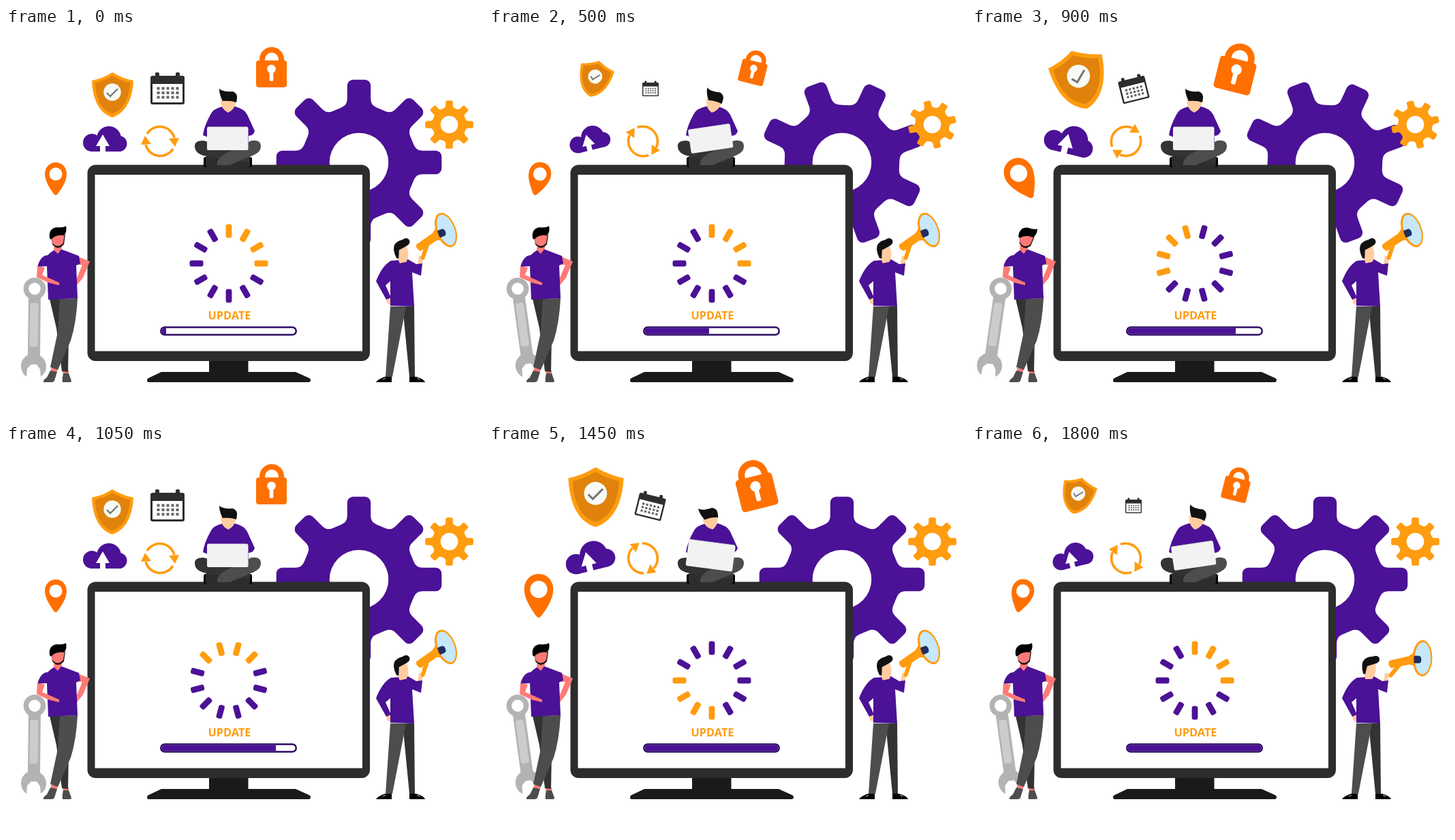
Recreate the animation shown at these times as an HTML page with a canvas. Size 700 by 570 pixels, loop 1850 ms.

```html
<!DOCTYPE html>
<html lang="en">
<head>
<meta charset="utf-8">
<title>Update</title>
<style>
html, body { margin: 0; width: 700px; height: 570px; overflow: hidden; background: #fff; }
canvas { display: block; }
</style>
</head>
<body>
<canvas id="stage" width="700" height="570"></canvas>
<script>
const ctx = document.getElementById('stage').getContext('2d');
const LOOP = 1850, STEP = 60, BEAT = 5;
const PURPLE = '#4b1196', ORANGE = '#ff9c0f', DEEP = '#ff7000', DARK = '#2d2d2d';
const GREY = '#4d4d4d', SHADE = '#333', SKIN = '#ffcc9f', PINK = '#ff7a76';

function shape(d, color) {
  ctx.fillStyle = color;
  ctx.fill(new Path2D(d));
}

function line(d, color, width) {
  ctx.strokeStyle = color;
  ctx.lineWidth = width;
  ctx.stroke(new Path2D(d));
}

function oval(x, y, rx, ry, color) {
  ctx.fillStyle = color;
  ctx.beginPath();
  ctx.ellipse(x, y, rx, ry, 0, 0, 7);
  ctx.fill();
}

const disc = (x, y, r, color) => oval(x, y, r, r, color);

function box(x, y, w, h, r, color) {
  ctx.fillStyle = color;
  ctx.beginPath();
  ctx.roundRect(x, y, w, h, r);
  ctx.fill();
}

// Turns and scales a part around its pivot, then shifts it.
function turned(x, y, deg, draw, size = 1, dx = 0, dy = 0) {
  ctx.save();
  ctx.translate(x + dx, y + dy);
  ctx.rotate(deg * Math.PI / 180);
  ctx.scale(size, size);
  ctx.translate(-x, -y);
  draw();
  ctx.restore();
}

// Linear value between key points [step, value].
function along(points, n) {
  const i = Math.max(1, points.findIndex(p => p[0] >= n));
  const [a, va] = points[i - 1], [b, vb] = points[i];
  return va + (vb - va) * (n - a) / (b - a);
}

function gear(x, y, tip, body, half, hole, deg, color) {
  const corners = [];
  for (let i = 0; i < 8; i++) {
    const a = (deg + i * 45) * Math.PI / 180, c = Math.cos(a), s = Math.sin(a);
    for (const [u, r] of [[-half, body], [-half, tip], [half, tip], [half, body]]) {
      corners.push({ x: x + u * c + r * s, y: y + u * s - r * c, round: half * (r === tip ? 0.5 : 0.8) });
    }
  }
  const last = corners[corners.length - 1];
  ctx.fillStyle = color;
  ctx.beginPath();
  ctx.moveTo((last.x + corners[0].x) / 2, (last.y + corners[0].y) / 2);
  corners.forEach((p, i) => {
    const next = corners[(i + 1) % corners.length];
    ctx.arcTo(p.x, p.y, next.x, next.y, p.round);
  });
  ctx.fill();
  disc(x, y, hole, '#fff');
}

function monitor() {
  box(119.5, 200.5, 414.5, 287.5, 12, DARK);
  box(130.5, 215, 392.5, 258.5, 0, '#fff');
  box(298, 488, 57.5, 17, 0, '#1a1a1a');
  shape('M228 504H425L445 513Q447 514 447 516Q447 519 444 519H209Q207 519 207 516Q207 514 209 513Z', '#1a1a1a');
}

function spinner(start) {
  for (let i = 0; i < 12; i++) {
    turned(327, 345, start + i * 30, () =>
      box(322.6, 287.5, 8.8, 20, 3, i < 4 ? ORANGE : PURPLE));
  }
}

function progress(width) {
  ctx.fillStyle = ORANGE;
  ctx.font = '700 16.3px "Open Sans", sans-serif';
  ctx.textAlign = 'center';
  ctx.fillText('UPDATE', 328, 426.5);
  const bar = color => box(228.5, 439.7, 196, 8.6, 4.3, color);
  box(226, 437.2, 201, 13.6, 6.8, '#2d0b63');
  bar('#fff');
  ctx.save();
  ctx.beginPath();
  ctx.rect(227, 437, width, 14);
  ctx.clip();
  bar(PURPLE);
  ctx.restore();
}

function shield() {
  const edge = 'M156 65Q171 74 187 77C186 100 178 124 156 131C134 124 127 100 126 77Q142 74 156 65Z';
  shape(edge, ORANGE);
  turned(156, 97, 0, () => shape(edge, '#e0820c'), 0.84);
  disc(156, 94, 12.7, '#f7faf5');
  line('M148 95L153 100L164 89', '#777', 2.3);
}

function calendar() {
  box(212, 70, 50, 42, 3, DARK);
  for (const x of [219, 249]) box(x, 65, 6, 11, 2, DARK);
  box(215, 82, 44, 27, 0, '#fff');
  for (let i = 0; i < 15; i++) {
    box(221.5 + i % 5 * 7, 86.5 + Math.floor(i / 5) * 6.5, 4, 4, 0, '#666');
  }
}

function lock() {
  line('M376 52V46A14 14 0 0 1 404 46V52', DEEP, 8);
  box(367, 47.5, 45, 39.5, 4, DEEP);
  disc(389.5, 60, 6.3, '#fff');
  box(386.7, 62, 5.6, 16, 2, '#fff');
}

function cloud() {
  disc(151, 162, 18, PURPLE);
  disc(126, 168, 13, PURPLE);
  disc(166, 169.5, 11.5, PURPLE);
  box(124, 166, 44, 15, 2, PURPLE);
  shape('M142 156L152 173H146V182H138V173H132Z', '#fff');
}

function refresh() {
  for (const side of [0, 180]) {
    turned(226, 166, side, () => {
      line('M207 155A22 22 0 0 1 247 161', ORANGE, 3.6);
      shape('M239 162L254 161L248 174Z', ORANGE);
    });
  }
}

function pin() {
  shape('M73 197C63 197 57 205 57 214C57 225 66 237 70 243Q73 247 76 243C81 236 89 225 89 214C89 205 83 197 73 197Z', DEEP);
  disc(73, 214, 9.5, '#fff');
}

// Each icon rests, swells, shrinks and swells again, with its own lean on every beat.
const icons = [
  { draw: shield, x: 155, y: 94, lean: [0, 14, -15], swell: 1.33, shrink: 0.82, lift: 23 },
  { draw: calendar, x: 237, y: 89, lean: [14, 0, -14], swell: 0.8, shrink: 0.48 },
  { draw: lock, x: 389, y: 55, lean: [-14, 14, 14], swell: 1.22, shrink: 0.84 },
  { draw: cloud, x: 145, y: 155, lean: [-14, -14, 14], swell: 1.14, shrink: 0.94 },
  { draw: refresh, x: 226, y: 166, lean: [57, 38, -52], swell: 1, shrink: 1 },
  { draw: pin, x: 73, y: 221, lean: [0, 14, -29], swell: 1.33, shrink: 1.03 }
];

function drawIcon({ draw, x, y, lean, swell, shrink, lift = 0 }, pose) {
  if (pose === 0) return draw();
  turned(x, y, lean[pose - 1], draw, pose === 2 ? shrink : swell, 0, -lift);
}

function laptop() {
  box(295, 145, 60.5, 34, 2, '#f2f2f2');
  line('M296 145H354', '#ddd', 0.8);
}

// side: 0 straight, 1 towards the left, 2 towards the right
function sitter(side) {
  for (const x of [290, 354]) box(x, 189, 7, 15, 3, '#000');
  box(293, 187, 65, 17, 3, DARK);
  shape('M296 178V160L289 157Q291 143 300 127Q304 118 318 115H336Q349 118 354 127L365 151Q363 158 356 158V179Z', PURPLE);
  shape('M277 174Q276 165 290 165L342 180Q362 187 358 195L345 197L290 187Q277 183 277 174Z', SHADE);
  shape('M374 172Q373 163 360 165L320 185Q308 193 310 201H328L364 186Q375 181 374 172Z', GREY);
  turned(326, 118, [0, -15, 10][side], () => {
    shape('M315 105Q315 119 326 124Q337 119 338 105Z', SKIN);
    shape('M313 89Q318 94 333 93Q340 96 339 103L338 109Q330 106 318 107Q313 98 313 89Z', '#111');
  }, 1, side);
  turned(326, 162, [0, 7.5, -8.5][side], laptop, [1, 1.14, 1.03][side]);
}

function wrench() {
  shape('M33 392H51L50 480Q60 487 59 498Q58 506 51 511L50 500L45 493H37L31 499L30 511Q22 505 22 495Q22 485 32 479Z', '#b3b3b3');
  disc(42, 382, 16.3, '#b3b3b3');
  disc(42, 382, 8.8, '#fff');
  turned(41, 435, 1, () => box(35, 403, 12, 64, 3, '#ccc'));
}

function mechanic(lean) {
  turned(42, 382, lean, wrench);
  shape('M66 498L76 500L74 506H66ZM83 502H92V508H84Z', PINK);
  shape('M65 502L75 504L71 517Q70 519 67 519H55Q54 516 60 512ZM84 506H92L96 517Q96 519 94 519H83Q82 515 84 506Z', GREY);
  shape('M64 397H93L91 504L82 503L74 440Z', SHADE);
  shape('M79 397L105 396Q103 433 95 458L76 501L65 497L76 445Z', GREY);
  shape('M106 335L123 342L113 366L104 377L102 371L112 347H106Z', PINK);
  shape('M61 333Q70 324 78 323L107 334L109 345L103 348L105 396L62 398L60 349L46 350Q51 333 61 333Z', PURPLE);
  shape('M46 349L57 351L53 362L78 373V377L62 373L45 365Z', PINK);
  shape('M71 317H82V323L76 331L70 325Z', PINK);
  turned(76, 322, lean > 0 ? 15 : 0, () => {
    shape('M66 303H87L85 317Q76 327 68 317Z', '#111');
    shape('M66 302H86L84 315Q76 324 68 315Z', PINK);
    shape('M64 308Q62 294 74 292Q84 293 88 290Q90 299 85 304Q74 302 66 310Z', '#000');
  });
}

function megaphone() {
  shape('M621 324L611 337Q612 342 616 340L630 323Z', ORANGE);
  shape('M612 316L640 309Q651 303 656 288V334Q651 322 642 321L615 327Q609 322 612 316Z', ORANGE);
  oval(660.5, 311.5, 14.5, 26.5, ORANGE);
  oval(661, 311.5, 11.8, 23.5, '#c6e8fa');
  box(648, 308, 8, 11, 2, '#2b2b55');
  oval(656, 313.5, 3, 5.3, '#17326b');
}

function speaker(raised) {
  shape('M543 519Q545 515 556 511H566V519ZM592 511H602Q613 514 615 519H592Z', '#000');
  line('M553 515L557 513M603 513L607 515', '#fff', 0.8);
  shape('M582 408H599L600 511H592Z', SHADE);
  shape('M564 408H587L567 511H557Z', GREY);
  shape('M557 395L564 394L567 406L560 404Z', SKIN);
  shape('M604 348L606 334H611V348Z', SKIN);
  shape('M543 371Q552 348 565 341L590 339L602 346L611 345L609 363L596 358L599 408L564 407V371L557 377L565 395L558 398Z', PURPLE);
  turned(585, 345, raised ? -12 : 0, () => {
    shape('M576 319H592Q594 331 590 339L587 343H577L575 330Z', SKIN);
    shape('M574 335Q570 320 576 314Q581 310 588 310Q596 307 598 313Q599 319 590 321L580 324L577 336Z', '#111');
  }, 1, raised ? 1 : 0);
  turned(608, 338, raised ? -21 : 1, megaphone, 1, raised ? -2 : 0, raised ? 1.5 : 0);
}

// The turn and the load both pause for one step after the eighth.
const spin = [[0, 0], [4, 120], [8, 360], [9, 360], [15, 615], [30, 1080]];
const load = [[0, 8], [4, 32], [8, 96], [9, 96], [15, 160], [24, 200]];
const wrenchLean = [0, 7.5, -8.5, 7.5, 0, -8.5, -8.5];

function draw(time) {
  const n = Math.floor(time / STEP);
  const beat = Math.floor((n + 3) / BEAT);
  const pose = beat % 4;
  const shifted = beat === 2 || beat === 3;
  box(0, 0, 700, 570, 0, '#fff');
  gear(518, 197, 121.3, 84, 17.2, 43.3, shifted ? 25 : 0, PURPLE);
  gear(650.5, 141.5, 35.3, 25, 5.3, 12.8, shifted ? -13 : 0, ORANGE);
  monitor();
  spinner(Math.round(along(spin, n) / 15) * 15);
  progress(along(load, Math.min(n, 24)));
  icons.forEach(icon => drawIcon(icon, pose));
  sitter(pose % 3);
  mechanic(wrenchLean[beat]);
  speaker(Math.floor((n + 1) / 4) % 2 === 0);
}

function tick() {
  draw(performance.now() % LOOP);
  requestAnimationFrame(tick);
}
tick();
</script>
</body>
</html>
```
